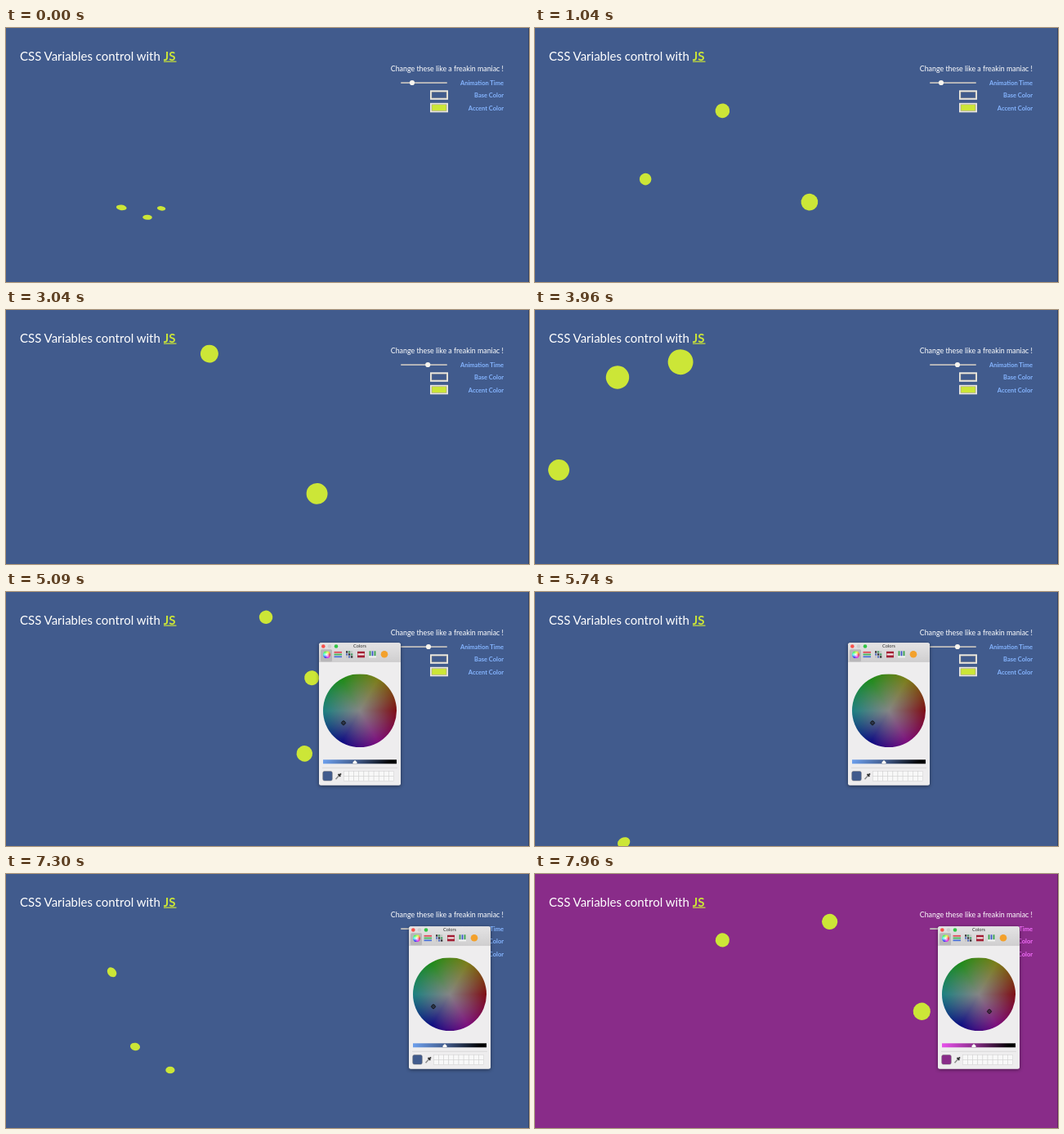
These frames come from a looping animation (640 by 311 pixels, 8 s). An HTML page:

```html
<!DOCTYPE html>
<html lang="en">
<head>
<meta charset="utf-8">
<title>CSS Variables control with JS</title>
<style>
  :root { --base: #415b8d; --label: #85b5ff; --bright: #6c9fec; --accent: #cce637; }
  html, body { margin: 0; width: 100%; height: 100%; overflow: hidden; background: var(--base); }
  svg { display: block; width: 100vw; height: 100vh; }
  text { font-family: Lato, "Open Sans", sans-serif; fill: #fff; }
  .title { font-size: 15px; }
  .title tspan { font-weight: 700; fill: var(--accent); }
  .hint { font-size: 8.85px; text-anchor: end; }
  .label { font-size: 7.5px; font-weight: 700; text-anchor: end; fill: var(--label); }
  .accent { fill: var(--accent); }
  .base { fill: var(--base); }
  .wheel {
    width: 100%; height: 100%; border-radius: 50%;
    background: radial-gradient(closest-side, #858585, #85858500),
      conic-gradient(from 90deg, #7d0c14, #7d0c7d, #0b0a82, #1c8080, #1c8b17, #7d7d18, #7d0c14);
  }
  .mini { filter: brightness(1.9); }
  #picker { filter: drop-shadow(0 1px 2px #0007); }
</style>
</head>
<body>
<svg viewBox="0 0 640 311" preserveAspectRatio="none">
  <defs>
    <linearGradient id="shade">
      <stop stop-color="var(--bright)"/>
      <stop offset=".45" stop-color="var(--base)"/>
      <stop offset=".92"/>
    </linearGradient>
    <linearGradient id="bar" x2="0" y2="1">
      <stop stop-color="#e4e3e4"/>
      <stop offset="1" stop-color="#d0cfd0"/>
    </linearGradient>
    <g id="input">
      <rect width="22" height="11.5" fill="#ece8de"/>
      <rect x="2" y="2" width="18" height="7.5" stroke="#918f8c" stroke-width=".5"/>
    </g>
  </defs>

  <path d="M639.5 0V311" stroke="#000" opacity=".25"/>
  <text class="title" x="17" y="39.5">CSS Variables control with <tspan>JS</tspan></text>
  <rect class="accent" x="193" y="40.5" width="15.5" height="1.2"/>

  <text class="hint" x="609" y="53">Change these like a freakin maniac !</text>
  <text class="label" x="609" y="70.2">Animation Time</text>
  <text class="label" x="609" y="85">Base Color</text>
  <text class="label" x="609" y="100.5">Accent Color</text>
  <rect x="483" y="66.2" width="57" height="1.8" rx=".9" fill="#c4c1bd"/>
  <circle id="thumb" cy="67" r="3.1" fill="#f5f3ee"/>
  <use href="#input" class="base" x="519" y="76.3"/>
  <use href="#input" class="accent" x="519" y="91.8"/>

  <g id="balls"></g>

  <g id="picker">
    <rect width="100" height="174.5" rx="2.5" fill="#eeedee"/>
    <path d="M0 23V2.5Q0 0 2.5 0H97.5Q100 0 100 2.5V23Z" fill="url(#bar)"/>
    <path d="M0 23H100" stroke="#b9b8b9" stroke-width=".6"/>
    <circle cx="5.3" cy="4.2" r="2.3" fill="#f9514b"/>
    <circle cx="13" cy="4.2" r="2.3" fill="#cfcfcf"/>
    <circle cx="21" cy="4.2" r="2.3" fill="#32c546"/>
    <text x="50" y="6.2" text-anchor="middle" style="font-size:5.6px;fill:#333">Colors</text>

    <rect x="2" y="8" width="14" height="15" rx="1.5" fill="#b8b7b9"/>
    <foreignObject x="4.5" y="9.5" width="9" height="9"><div class="wheel mini"></div></foreignObject>
    <path d="M18.5 11.5H28" stroke="#e04a5a" stroke-width="1.8"/>
    <path d="M18.5 14.2H28" stroke="#45b65a" stroke-width="1.8"/>
    <path d="M18.5 17H28" stroke="#4a72d8" stroke-width="1.8"/>
    <g id="chips"></g>
    <rect x="47" y="10.5" width="9" height="7.5" fill="#a31d33"/>
    <rect x="47.5" y="13" width="8" height="2.2" fill="#f2e9e8"/>
    <rect x="61" y="10" width="9" height="8" fill="#f3f3f3"/>
    <path d="M62.5 10V16M68.5 10V16" stroke="#3d9e50" stroke-width="2"/>
    <path d="M65.5 10V16" stroke="#4158c4" stroke-width="2"/>
    <circle cx="80" cy="14" r="4.3" fill="#f3a12c"/>

    <foreignObject x="5" y="38" width="90" height="90"><div class="wheel"></div></foreignObject>
    <g id="marker" fill="none" stroke="#111">
      <circle r="2.2"/><path d="M-3.2 0H3.2M0-3.2V3.2" stroke-width=".6"/>
    </g>

    <rect x="5" y="143" width="90" height="5" fill="url(#shade)"/>
    <path d="M41.5 148V146L44 143.7L46.5 146V148Z" fill="#fff" stroke="#999" stroke-width=".3"/>
    <path d="M4 153H96" stroke="#cbcacb" stroke-width=".6"/>
    <rect class="base" x="4.7" y="157.2" width="11.6" height="11.6" rx="2" stroke="#777" stroke-width=".5"/>
    <path d="M20.5 167L25 162" stroke="#8c8c8c" stroke-width="1.5"/>
    <path d="M23.5 160.7L26.3 163.5M25 162L27 160" stroke="#333" stroke-width="1.8"/>
    <g id="cells" stroke="#cfcfcf" stroke-width=".5"></g>
  </g>
</svg>
<script>
const LOOP = 8000;
const $ = id => document.getElementById(id);

function add(parent, tag, attrs) {
  const node = document.createElementNS("http://www.w3.org/2000/svg", tag);
  for (const name in attrs) node.setAttribute(name, attrs[name]);
  parent.append(node);
  return node;
}

function addGrid(parent, columns, rows, left, top, pitch, size, colors) {
  for (let i = 0; i < columns * rows; i++)
    add(parent, "rect", {
      x: left + i % columns * pitch, y: top + Math.floor(i / columns) * pitch,
      width: size, height: size, fill: colors[i % colors.length]
    });
}
addGrid($("cells"), 10, 2, 30.5, 157, 6.1, 6.1, ["#f8f8f8"]);
addGrid($("chips"), 3, 3, 33, 10, 3, 2.3, ["#333", "#4c9c68", "#c4c4c4", "#566fc0"]);

// The balls circle a drifting centre: phase and step in degrees, lean shifts the middle ball.
const orbits = [
  { time: 0, x: 166, y: 202, reach: 30.5, phase: 91, step: 53, lean: -.27, size: 5.8 },
  { time: 1960, x: 296, y: 203, reach: 164, phase: 443, step: 119, lean: 0, size: 11.5 },
  { time: 3960, x: 172, y: 207, reach: 143.4, phase: 948, step: 44, lean: .27, size: 14.2 },
  { time: 5090, x: 250.5, y: 140, reach: 128.5, phase: 1424, step: 42.5, lean: 0, size: 9 },
  { time: 6350, x: 209, y: 326, reach: 150, phase: 1695, step: 9.7, lean: 0, size: 6.1 },
  { time: 7300, x: 239, y: 136, reach: 110.6, phase: 1949, step: 39, lean: -.31, size: 6.1 },
  { time: 7960, x: 319.5, y: 213, reach: 160, phase: 2089.5, step: 54, lean: -.09, size: 9.6 }
];
const balls = [-1, 0, 1].map(place => ({ place, node: add($("balls"), "ellipse", { class: "accent" }) }));

const clamp = u => Math.min(1, Math.max(0, u));
const mix = (a, b, u) => a + (b - a) * u;
const sin = degrees => Math.sin(degrees * Math.PI / 180);
const cos = degrees => sin(degrees + 90);

function ease(t, start, end) {
  const u = clamp((t - start) / (end - start));
  return u * u * (3 - 2 * u);
}

function orbitAt(t) {
  const next = orbits.findIndex(orbit => orbit.time > t);
  const [from, to] = next < 0 ? orbits.slice(-2) : orbits.slice(next - 1, next + 1);
  const u = (t - from.time) / (to.time - from.time);
  return Object.fromEntries(Object.keys(from).map(key => [key, mix(from[key], to[key], u)]));
}

function drawBalls(t) {
  const { x, y, reach, phase, step, lean, size } = orbitAt(t);
  // Distant balls are seen edge-on along the lower half of the orbit.
  const flat = 1 - .48 * clamp((9 - size) / 3) * Math.max(0, sin(phase));
  for (const { place, node } of balls) {
    const angle = phase + step * (place || lean);
    const radius = size * (1 + place * step / 500);
    const top = y + reach * sin(angle);
    node.setAttribute("rx", radius);
    node.setAttribute("ry", radius * flat);
    node.setAttribute("transform",
      `translate(${x + reach * cos(angle)} ${top}) rotate(${(240 - top) * .4})`);
  }
}

function setColors(purple) {
  const style = document.documentElement.style;
  style.setProperty("--base", purple ? "#892c89" : "#415b8d");
  style.setProperty("--label", purple ? "#f06cf8" : "#85b5ff");
  style.setProperty("--bright", purple ? "#e852ec" : "#6c9fec");
}

function draw(t) {
  const drag = ease(t, 6700, 7150), purple = t >= 7700;
  drawBalls(t);
  setColors(purple);
  $("thumb").setAttribute("cx", 497 + 20 * ease(t, 2600, 3100));
  $("picker").style.display = t < 4750 ? "none" : "";
  $("picker").setAttribute("transform", `translate(${383 + 110 * drag} ${62.3 + 2 * drag})`);
  $("marker").setAttribute("transform", purple ? "translate(63 104)" : "translate(30 98)");
}

const start = performance.now();
function frame() {
  draw((performance.now() - start) % LOOP);
  requestAnimationFrame(frame);
}
frame();
</script>
</body>
</html>
```
